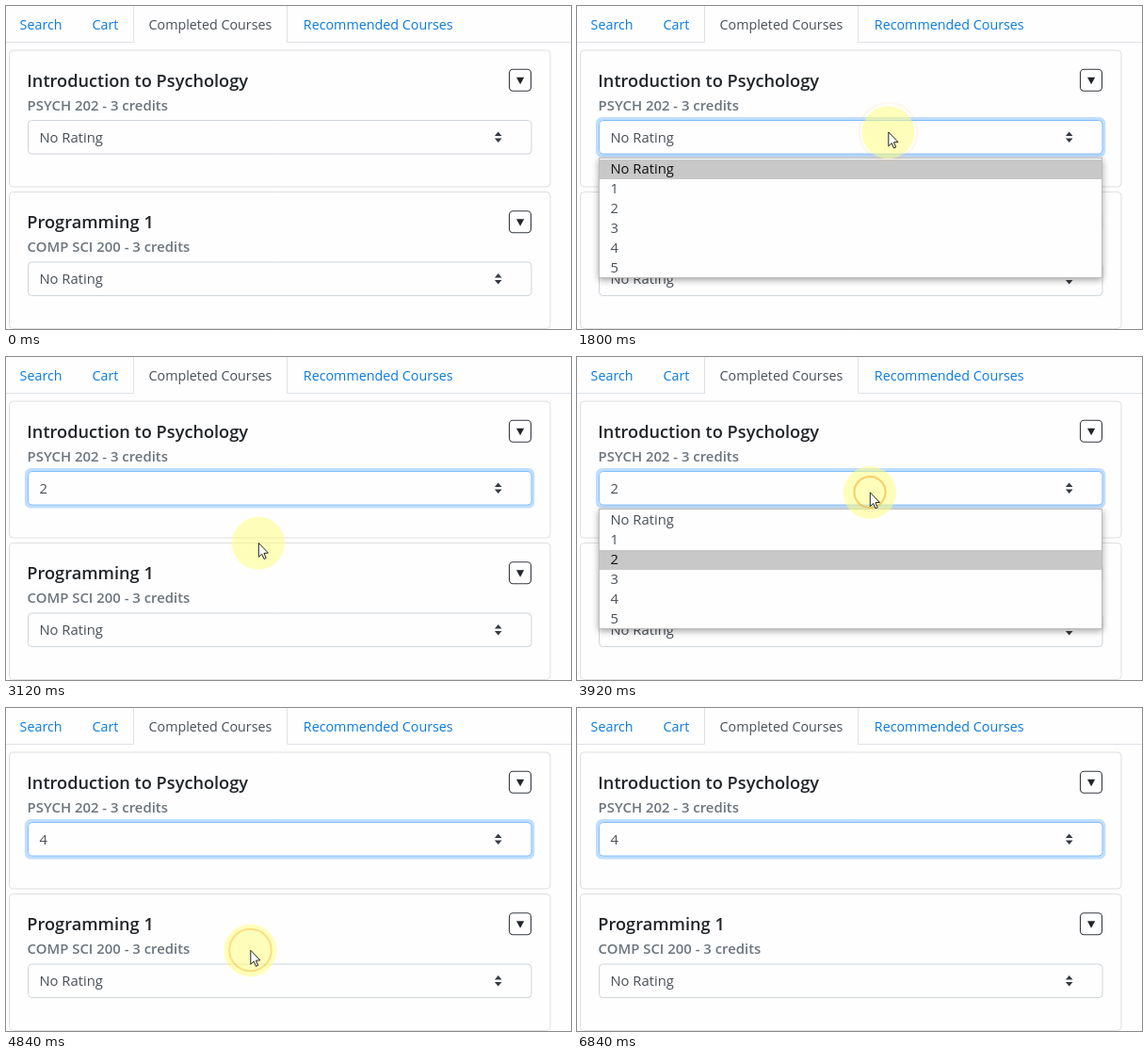
These frames come from a looping animation (600x343 px, 7120 ms). An HTML page with a canvas:

```html
<!DOCTYPE html>
<html lang="en">
<head>
<meta charset="utf-8">
<title>Course ratings</title>
<style>
  html, body { margin: 0; width: 100%; height: 100%; overflow: hidden; background: #fefefe; }
  canvas { display: block; width: 600px; height: 343px; }
</style>
</head>
<body>
<canvas id="stage"></canvas>
<script>
const W = 600, H = 343, LOOP = 7120, STEP = 40;
const PAPER = '#fefefe', INK = '#212529', MUTED = '#6c757d', FIELD = '#495057', LINK = '#0a7be0';
const FONT = '"Open Sans", "Noto Sans", sans-serif';
const OPTIONS = ['No Rating', '1', '2', '3', '4', '5'];
const ROW_TOP = 162.5, ROW_H = 21, HOVER_LAG = 80;

// Pointer stops: time, x, y
const PATH = [
  [280, 440, -32], [880, 341.5, 124], [1000, 341.5, 124], [1280, 333, 131],
  [1720, 333, 131], [2480, 253, 216], [2920, 253, 216], [3520, 311, 143.5],
  [3980, 311, 143.5], [4364, 263, 257], [4560, 259.5, 257],
  [6420, 259.5, 257], [6800, 399, -32]
];
const CLICKS = [1440, 2560, 3760, 4600];
const MENUS = [
  { open: 1480, close: 2680, value: 0 },
  { open: 3800, close: 4680, value: 2 }
];

const canvas = document.getElementById('stage');
const ctx = canvas.getContext('2d');
const ratio = window.devicePixelRatio || 1;
canvas.width = W * ratio;
canvas.height = H * ratio;

const smooth = p => p * p * (3 - 2 * p);

function pointerAt(t) {
  if (t < PATH[0][0] || t >= PATH[PATH.length - 1][0]) return null;
  const i = PATH.findIndex(stop => stop[0] > t);
  const [t0, x0, y0] = PATH[i - 1], [t1, x1, y1] = PATH[i];
  const s = smooth((t - t0) / (t1 - t0));
  return { x: x0 + (x1 - x0) * s, y: y0 + (y1 - y0) * s };
}

function text(str, x, y, size, color, weight = 400) {
  ctx.font = `${weight} ${size}px ${FONT}`;
  ctx.fillStyle = color;
  ctx.fillText(str, x, y);
}

function box(x, y, w, h, r, stroke, width = 1, fill = PAPER) {
  ctx.beginPath();
  ctx.roundRect(x, y, w, h, r);
  if (fill) { ctx.fillStyle = fill; ctx.fill(); }
  ctx.strokeStyle = stroke;
  ctx.lineWidth = width;
  ctx.stroke();
}

function shape(points, fill) {
  ctx.beginPath();
  points.forEach(([x, y]) => ctx.lineTo(x, y));
  ctx.closePath();
  ctx.fillStyle = fill;
  ctx.fill();
}

function line(points, color) {
  ctx.beginPath();
  points.forEach(([x, y]) => ctx.lineTo(x, y));
  ctx.strokeStyle = color;
  ctx.lineWidth = 1;
  ctx.stroke();
}

function drawTabs() {
  line([[0, 38.5], [135.5, 38.5], [135.5, 0]], '#dee2e6');
  line([[298.5, 0], [298.5, 38.5], [W, 38.5]], '#dee2e6');
  text('Search', 14.6, 25, 14.3, LINK);
  text('Cart', 91.5, 25, 14.3, LINK);
  text('Completed Courses', 151.5, 25, 14.3, FIELD);
  text('Recommended Courses', 315.8, 25, 14.3, LINK);
}

function drawCard(top, title, code, value, focused) {
  ctx.save();
  ctx.translate(0, top);
  box(3.5, 0, 574.5, 145, 4, '#dfdfdf');
  text(title, 22.3, 38.8, 18.2, INK, 600);
  text(code, 22.6, 63.5, 14.9, MUTED, 600);

  box(534.5, 20.3, 23, 22.9, 4, '#343a40', 1.1);
  shape([[542, 28.7], [550.2, 28.7], [546.1, 36.2]], INK);

  if (focused) box(21.6, 72.7, 538, 39.2, 5, '#bfdeff', 3.4, null);
  box(23.5, 74.5, 534.5, 35.6, 4, focused ? '#80bdff' : '#ced4da');
  text(value, 35.4, 97.8, 14.8, FIELD);
  shape([[518.9, 91], [526.5, 91], [522.7, 86.4]], '#343a40');
  shape([[518.9, 93.5], [526.5, 93.5], [522.7, 98.1]], '#343a40');
  ctx.restore();
}

function drawMenu(active) {
  ctx.save();
  ctx.shadowColor = 'rgba(0, 0, 0, .36)';
  ctx.shadowBlur = 7 * ratio;
  ctx.shadowOffsetY = 2 * ratio;
  ctx.fillStyle = PAPER;
  ctx.fillRect(23, 161, 535, 128);
  ctx.restore();
  ctx.strokeStyle = '#bcbcbc';
  ctx.lineWidth = 1;
  ctx.strokeRect(23.5, 161.5, 534, 127);
  OPTIONS.forEach((label, i) => {
    const top = ROW_TOP + i * ROW_H;
    if (i === active) {
      ctx.fillStyle = '#c8c8c8';
      ctx.fillRect(24, Math.round(top), 533, ROW_H);
    }
    text(label, 35.4, top + 15.8, 14.8, i === active ? '#101010' : FIELD);
  });
}

function activeRow(t, menu) {
  const p = pointerAt(t - HOVER_LAG);
  if (!p || p.y < ROW_TOP) return menu.value;
  return Math.min(OPTIONS.length - 1, Math.floor((p.y - ROW_TOP) / ROW_H));
}

function drawPointer(t) {
  const p = pointerAt(t);
  if (!p) return;
  ctx.save();
  ctx.translate(p.x, p.y);

  ctx.beginPath();
  ctx.arc(0, 0.5, 28, 0, Math.PI * 2);
  ctx.fillStyle = 'rgba(255, 255, 125, .52)';
  ctx.fill();

  const click = CLICKS.find(c => t >= c && t < c + 400);
  if (click !== undefined) {
    const age = t - click;
    ctx.beginPath();
    ctx.arc(0, 0, 5 + age * 0.072, 0, Math.PI * 2);
    ctx.strokeStyle = `rgba(248, 172, 50, ${1 - age / 400})`;
    ctx.lineWidth = 2;
    ctx.stroke();
  }

  shape([[0.3, 0.3], [0.3, 15.2], [3.7, 12], [6, 17.3], [8.2, 16.3], [5.9, 11.2], [10.4, 10.9]], '#fff');
  ctx.strokeStyle = '#222';
  ctx.lineWidth = 1;
  ctx.lineJoin = 'round';
  ctx.stroke();
  ctx.restore();
}

function draw(t) {
  ctx.setTransform(ratio, 0, 0, ratio, 0, 0);
  ctx.fillStyle = PAPER;
  ctx.fillRect(0, 0, W, H);

  const chosen = t < MENUS[0].close ? 0 : t < MENUS[1].close ? 2 : 4;
  const menu = MENUS.find(m => t >= m.open && t < m.close);
  drawTabs();
  drawCard(47, 'Introduction to Psychology', 'PSYCH 202 - 3 credits', OPTIONS[chosen], t >= MENUS[0].open);
  drawCard(197.5, 'Programming 1', 'COMP SCI 200 - 3 credits', OPTIONS[0], false);
  if (menu) drawMenu(activeRow(t, menu));
  drawPointer(t);
}

const start = performance.now();
function tick() {
  const t = (performance.now() - start) % LOOP;
  draw(Math.floor(t / STEP) * STEP);
  requestAnimationFrame(tick);
}
tick();
</script>
</body>
</html>
```
